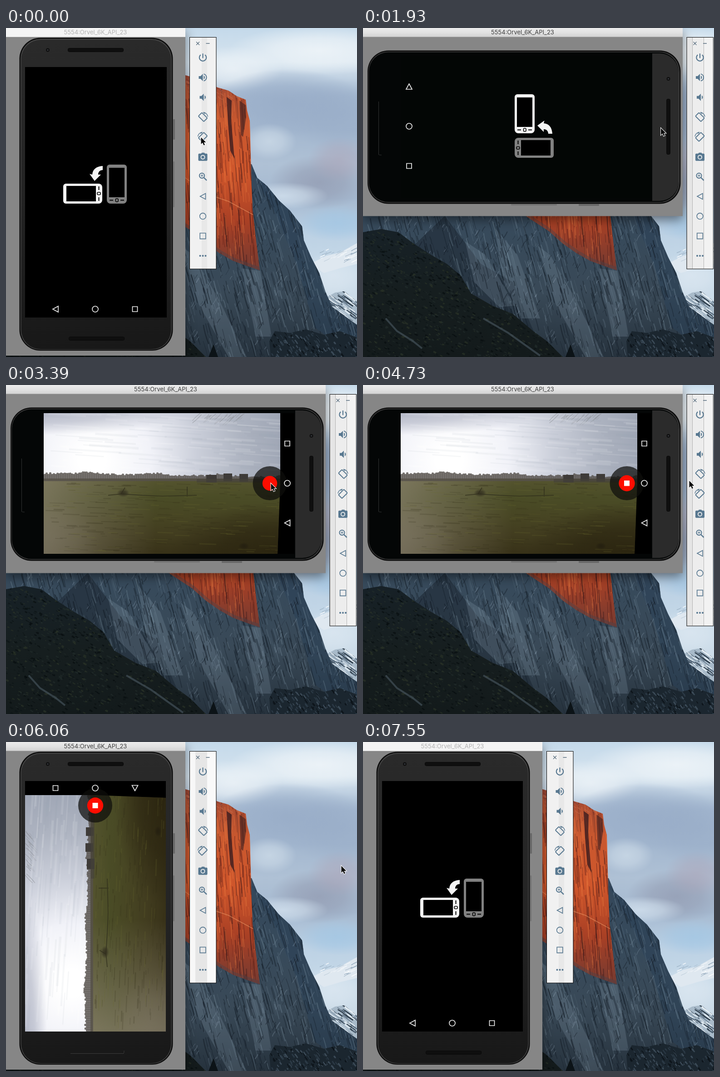
An HTML page with a canvas that plays this animation: 773 px wide and 725 px high, repeating every 7.65 s.

```html
<!DOCTYPE html>
<html lang="en">
<head>
<meta charset="utf-8">
<title>Emulator rotation</title>
<style>
html, body { margin: 0; width: 773px; height: 725px; overflow: hidden; background: #888; }
canvas { display: block; }
#title {
  position: absolute; left: 0; top: 0; height: 20px;
  text-align: center; white-space: pre; font: 13px/19px Inter, "Open Sans", sans-serif;
}
</style>
</head>
<body>
<canvas id="stage" width="773" height="725"></canvas>
<div id="title">5554:Orvel_6K_API_23</div>
<script>
const W = 773, H = 725, LOOP = 7650;
const stage = document.getElementById('stage').getContext('2d');
const title = document.getElementById('title');

// Times at which the picture may change
const STEPS = [0, 300, 450, 590, 1040, 1190, 1340, 1630, 1780, 1930, 2080, 2220, 2370, 2520,
  2660, 2810, 2960, 3110, 3250, 3390, 3540, 3690, 3840, 4140, 4290, 4430, 4580, 4730, 4880,
  5030, 5180, 5470, 5620, 5910, 6060, 6210, 6360, 6650, 6800, 6950, 7550];

// The window turns soon after a click; the screen inside follows a second later
const CLICK = 300, WIDE = 450, REC = 3840, TALL = 5910, IDLE = 7550;
const FLIP_IN = 2145, FLIP_OUT = 6575, FLIP = 400, FADE = 170;

// Pointer path: time, x, y
const PATH = [[0, 429, 241], [590, 429, 241], [1040, 450, 236], [1190, 570, 200], [1340, 668, 171],
  [1630, 672, 196], [1780, 676, 220], [2220, 616, 222], [2810, 615, 222], [3250, 583, 217],
  [4140, 583, 217], [4730, 718, 211], [5030, 734, 204], [5620, 733, 198], [5910, 735, 246],
  [6060, 738, 273], [6210, 762, 300]];

function random(seed) {
  return () => {
    seed = (seed + 0x6d2b79f5) | 0;
    let v = Math.imul(seed ^ seed >>> 15, 1 | seed);
    v = v + Math.imul(v ^ v >>> 7, 61 | v) ^ v;
    return ((v ^ v >>> 14) >>> 0) / 4294967296;
  };
}

function layer(paint) {
  const c = document.createElement('canvas');
  c.width = W; c.height = H;
  paint(c.getContext('2d'));
  return c;
}

function ramp(g, x0, y0, x1, y1, ...stops) {
  const grad = g.createLinearGradient(x0, y0, x1, y1);
  stops.forEach((c, i) => grad.addColorStop(i / (stops.length - 1), c));
  return grad;
}

function box(g, color, x, y, w, h, r = 0) {
  g.fillStyle = color;
  g.beginPath(); g.roundRect(x, y, w, h, r); g.fill();
}

function disc(g, color, x, y, r) {
  g.fillStyle = color;
  g.beginPath(); g.arc(x, y, r, 0, 7); g.fill();
}

const shape = d => new Path2D(d);

function fill(g, color, d) {
  g.fillStyle = color;
  g.fill(shape(d));
}

function line(g, color, width, d) {
  g.strokeStyle = color; g.lineWidth = width;
  g.stroke(shape(d));
}

function blob(g, rgb, alpha, x, y, rx, ry) {
  g.save();
  g.translate(x, y); g.scale(rx, ry);
  const grad = g.createRadialGradient(0, 0, 0, 0, 0, 1);
  grad.addColorStop(0, `rgba(${rgb},${alpha})`);
  grad.addColorStop(.5, `rgba(${rgb},${alpha * .7})`);
  grad.addColorStop(1, `rgba(${rgb},0)`);
  g.fillStyle = grad;
  g.fillRect(-1, -1, 2, 2);
  g.restore();
}

// Scattered strokes running along (dx, dy)
function grain(g, seed, count, [x, y, w, h], dx, dy, width, colors) {
  const rnd = random(seed);
  for (let i = 0; i < count; i++) {
    const px = x + rnd() * w, py = y + rnd() * h, k = .3 + rnd();
    const bend = (rnd() - .5) * 6;
    g.strokeStyle = colors[Math.floor(rnd() * colors.length)];
    g.lineWidth = width * (.4 + rnd());
    g.beginPath();
    g.moveTo(px, py);
    g.quadraticCurveTo(px + dx * k / 2 + bend, py + dy * k / 2, px + dx * k, py + dy * k);
    g.stroke();
  }
}

function masked(g, d, paint) {
  g.save();
  g.clip(shape(d));
  paint();
  g.restore();
}

const wallpaper = layer(g => {
  g.fillStyle = ramp(g, 0, 0, 0, 600, '#c4d9ea', '#d6e4ef', '#a9bdd4', '#a3b7cf', '#afc1d5',
    '#a5b9d0', '#bcd1e4', '#c6d9e8', '#cddce8');
  g.fillRect(0, 0, W, H);
  blob(g, '238,244,248', .9, 690, 50, 200, 55);
  blob(g, '238,244,248', .8, 500, 90, 110, 50);
  blob(g, '152,172,199', .9, 620, 165, 170, 75);
  blob(g, '152,172,199', .7, 740, 190, 130, 80);
  blob(g, '200,215,229', .9, 580, 250, 60, 40);
  blob(g, '150,160,182', .9, 690, 340, 110, 60);
  blob(g, '172,165,184', .6, 735, 290, 70, 50);
  blob(g, '206,221,235', .9, 610, 370, 100, 30);
  blob(g, '163,199,228', .8, 730, 430, 90, 40);
  blob(g, '218,230,240', .9, 720, 545, 80, 50);
  fill(g, '#dfe8f0', 'M670 520L705 502L735 495L773 474V520L740 528L700 540Z');
  grain(g, 3, 30, [690, 490, 80, 28], 14, -7, 1, ['#8fa5b9', '#fff']);
  const slope = 'M700 596L725 583L745 580L773 603V700H690Z';
  fill(g, '#a8bac9', slope);
  masked(g, slope, () =>
    grain(g, 5, 90, [695, 580, 78, 80], 18, 13, 2, ['#2d3c4a', '#e4edf3', '#53677a']));

  const rock = 'M395 300H541L553 330L575 348L601 380L625 402L652 437L656 468L672 505L690 540L703 580L718 614L745 634L773 654V725H0V300Z';
  fill(g, ramp(g, 0, 300, 0, 725, '#33475b', '#374a5b', '#394957', '#26323d'), rock);
  masked(g, rock, () => {
    fill(g, '#2a405688', 'M541 318L590 400L640 520L680 660L773 725V300Z');
    fill(g, '#1c273288', 'M180 414L260 520L330 560L400 725H200L90 500Z');
    for (const d of ['M385 480L412 500L470 600L530 725H490L425 610Z',
      'M225 470L270 500L335 612L300 615L245 560Z',
      'M290 440L340 500L390 640L350 640L310 560Z', 'M520 530L560 535L585 680H550Z'])
      fill(g, '#8a9dad3c', d);
    grain(g, 11, 1500, [0, 310, 773, 410], 10, 36, 2,
      ['#0f182266', '#8da2b340', '#16202b77', '#7489993c', '#0b121a66']);
    grain(g, 13, 500, [0, 310, 773, 410], -7, 12, 1.5, ['#0f182266', '#9fb2c244']);
  });

  const sunlit = 'M330 90L395 104L427 113L440 118L466 131L490 138L508 150L528 158L531 182L537 205L540 320L543 400L551 470L559 534L530 524L500 513L470 496L440 475L410 448L355 412Z';
  fill(g, ramp(g, 0, 100, 0, 535, '#9a4633', '#c9582f', '#cf562b', '#a94025', '#743a31'), sunlit);
  masked(g, sunlit, () => {
    grain(g, 21, 480, [345, 110, 215, 420], 4, 55, 2,
      ['#4a181466', '#f28a4a55', '#6a241a77', '#ea753c55', '#34171966']);
    fill(g, '#3a1c1fcc', 'M486 152L497 160L496 205L503 288L494 270L489 210Z');
    fill(g, '#4a2522aa', 'M514 160L528 170L529 195L522 240L517 235Z');
    line(g, '#f0a06c88', 1.5, 'M395 330L440 365L490 382L545 412');
    grain(g, 23, 70, [395, 108, 140, 45], 9, 6, 2, ['#7e3a35aa', '#c1694daa']);
    line(g, '#4a434966', 14, 'M355 412L410 448L440 475L470 496L500 513L559 534');
  });

  const woods = 'M0 450L40 443L78 450L110 474L150 500L185 520L215 545L238 585L285 612L330 630L375 668L405 690L440 725H0Z';
  fill(g, ramp(g, 0, 440, 0, 725, '#172127', '#161e1f', '#131a1b'), woods);
  masked(g, woods, () => {
    grain(g, 31, 1500, [0, 440, 440, 285], 5, 3, 3, ['#070c0eaa', '#2b3427aa', '#222c2aaa', '#0c1416aa']);
    line(g, '#51606c88', 4, 'M50 640L75 668L110 690L130 706');
    line(g, '#51606c88', 4, 'M265 640L320 672L390 722');
  });
  const trees = 'M583 725L580 690L592 668L625 672L660 664L700 676L735 668L773 682V725Z';
  fill(g, '#1b262f', trees);
  masked(g, trees, () =>
    grain(g, 37, 170, [580, 662, 193, 63], 5, 7, 2.5, ['#0d141a', '#2b3945', '#3b4a57']));
  fill(g, '#0c1317', 'M457 697L467 725H446Z');
});

const field = layer(g => {
  g.clip(shape('M83 61H604V215L598 372H83Z'));
  const glow = g.createRadialGradient(190, 165, 30, 190, 165, 430);
  ['#ffffff', '#f1f2f8', '#cbcfda', '#aeb4c1', '#9ea5b4'].forEach((c, i) => glow.addColorStop(i / 4, c));
  g.fillStyle = glow;
  g.fillRect(83, 61, 521, 160);
  blob(g, '160,165,183', .75, 83, 55, 330, 55);
  grain(g, 41, 120, [83, 62, 500, 125], 90, 6, 4, ['#ffffff1c', '#8f97a814']);
  grain(g, 43, 34, [425, 60, 100, 12], -16, 15, 1, ['#77787a66']);
  g.fillStyle = ramp(g, 0, 206, 0, 372, '#55542f', '#4a4c26', '#474523', '#413c1f', '#373118');
  g.fillRect(83, 206, 521, 170);
  g.fillStyle = ramp(g, 83, 0, 330, 0, '#958d7b99', '#958d7b00');
  g.fillRect(83, 206, 250, 170);
  blob(g, '40,34,14', .8, 590, 370, 230, 110);
  grain(g, 47, 300, [83, 215, 520, 155], 30, 1, 2, ['#2d2b1433', '#6b692f33', '#332e1744']);
  blob(g, '130,124,108', .3, 105, 340, 100, 80);

  // Treeline and farm buildings
  const rnd = random(53);
  for (let x = 83; x < 606; x += 4) {
    const top = 196 + (x - 83) * .016 - Math.max(0, Math.sin(x / 23) * 4) - rnd() * 4;
    box(g, '#55504ccc', x, top, 5, 212 - top, 2);
  }
  for (const [x, y, w] of [[441, 198, 23], [479, 195, 19], [514, 196, 19]]) box(g, '#3e3b38', x, y, w, 17);
  box(g, '#45423a99', 420, 207, 184, 8);
  line(g, '#2f2d1caa', 2, 'M225 243L255 240L300 243L345 245L420 243M253 241L262 226M399 224V246');
  blob(g, '46,42,28', .8, 258, 238, 14, 9);
  blob(g, '36,31,16', .9, 524, 355, 12, 8);
});

function navKeys(g, back, home, recent) {
  g.strokeStyle = '#ececec'; g.lineWidth = 1.7;
  g.beginPath();
  g.moveTo(back[0] - 6, back[1]); g.lineTo(back[0] + 6, back[1] - 6.5); g.lineTo(back[0] + 6, back[1] + 6.5);
  g.closePath();
  g.moveTo(home[0] + 6.5, home[1]); g.arc(...home, 6.5, 0, 2 * Math.PI);
  g.rect(recent[0] - 5.5, recent[1] - 5.5, 11, 11);
  g.stroke();
}

// Small phone pictogram, 44 by 86, upright
function miniPhone(g, color) {
  box(g, color, 0, 0, 44, 86, [6, 6, 8, 8]);
  box(g, '#000', 5, 7, 34, 65);
  box(g, '#000', 6, 77.5, 8, 2);
  box(g, '#000', 30, 77.5, 8, 2);
  g.strokeStyle = '#000'; g.lineWidth = 1.6;
  g.beginPath(); g.roundRect(19.5, 75, 5.5, 7, 2); g.stroke();
}

function prompt(g) {
  g.save(); g.translate(222, 301); miniPhone(g, '#818181'); g.restore();
  g.save(); g.translate(126, 387); g.rotate(-Math.PI / 2); miniPhone(g, '#f5f5f5'); g.restore();
  fill(g, '#f5f5f5', 'M213 304C199 305 191 311 190 323L184 321.5L195 337L209 323L203 323C203 317 207 313 213 313Z');
  navKeys(g, [109, 619.5], [196.5, 619.5], [284, 619.5]);
}

// A landscape device is the upright one turned a quarter clockwise
function toLandscape(g) { g.translate(721, 20); g.rotate(Math.PI / 2); }
function toUpright(g) { g.translate(-20, 721); g.rotate(-Math.PI / 2); }

function camera(g, recording) {
  g.save();
  toUpright(g);
  box(g, '#000', 83, 61, 554, 313);
  g.drawImage(field, 0, 0);
  disc(g, 'rgba(15,14,12,.72)', 581, 216.5, 37.5);
  disc(g, '#fd0d00', 581, 216.5, recording ? 17.7 : 16.2);
  if (recording) box(g, '#fff', 575, 210.5, 12, 12);
  navKeys(g, [619.5, 304], [619.5, 216.5], [619.5, 129]);
  g.restore();
}

function turned(g, degrees, alpha, paint) {
  g.save();
  g.globalAlpha = alpha;
  g.translate(197, 361); g.rotate(degrees * Math.PI / 180); g.translate(-197, -361);
  paint(g);
  g.restore();
}

// The half turn decelerates with the fifth power while the old screen fades
function screen(g, t, wide) {
  const cam = c => camera(c, t >= REC);
  const leaving = t >= TALL;
  const [from, to] = leaving ? [cam, prompt] : [prompt, cam];
  const age = t - (leaving ? FLIP_OUT : FLIP_IN);
  g.save();
  g.beginPath(); g.rect(42, 86, age < 0 && !leaving ? 312 : 310, 552); g.clip();
  box(g, wide ? '#030605' : '#000', 42, 86, 312, 552);
  if (age < 0) from(g);
  else {
    const angle = 180 * Math.max(0, 1 - age / FLIP) ** 5;
    turned(g, angle, 1, to);
    if (age < FADE) turned(g, angle - 180, 1 - age / FADE, from);
  }
  g.restore();
}

function grille(g, x, y) {
  box(g, '#0a0a0a', x, y, 123, 9, 4);
  for (let i = 0; i < 40; i++)
    for (let j = 0; j < 3; j++) box(g, '#2f2f2f', x + 2.5 + i * 3, y + 1.5 + j * 2.5, 1, 1);
}

// Drawn upright; the caller turns the whole device
function device(g, t, wide, fresh) {
  box(g, '#686868', 368, 201, 4, 45, 1);
  box(g, '#727272', 368, 294, 3, 101, 1);
  box(g, '#0c0c0c', 29.5, 21.5, 338, 689.5, 46);
  box(g, wide ? '#3a3a3a' : '#454545', 32, 24, 333, 685, 44);
  box(g, wide ? '#040606' : ramp(g, 0, 24, 0, 710, '#2a2a2a', '#242424', '#181818'), 33.5, 26, 330, 682, 43);
  if (wide) box(g, '#2b2b2b', 36, 26, 325, 58, [42, 42, 0, 0]);
  disc(g, '#101010', 92, 48.5, 4);
  disc(g, '#3b3f45', 92, 48.5, 1.5);
  grille(g, 136, 44);
  if (fresh) grille(g, 138, 680);
  else line(g, wide ? '#303232' : '#3c3c3c', 1, 'M142 686.5H259Q260 686 260 680');
  screen(g, t, wide);
}

const INK = '#587890';

function rotateIcon(g, flip) {
  g.save();
  g.scale(flip, 1);
  g.save(); g.rotate(-Math.PI / 4);
  g.lineWidth = 2; g.strokeStyle = INK;
  g.beginPath(); g.roundRect(-5.5, -8.5, 11, 17, 1.5); g.stroke();
  g.restore();
  line(g, INK, 1.5, 'M1 -10.5A11 11 0 0 1 11 -1M1 -10.5L5 -7');
  g.restore();
}

const ICONS = [
  g => line(g, INK, 2.2, 'M-4.8 -6.2A7.7 7.7 0 1 0 4.8 -6.2M0 -9V1'),
  g => {
    fill(g, INK, 'M-9 -3H-5L0 -8V8L-5 3H-9ZM2 -4.5Q7 0 2 4.5Z');
    line(g, INK, 2, 'M2 -7.6A7.8 7.8 0 0 1 2 7.6');
  },
  g => fill(g, INK, 'M-7 -3H-3L2 -8V8L-3 3H-7ZM4 -4.5Q9 0 4 4.5Z'),
  g => rotateIcon(g, 1),
  g => rotateIcon(g, -1),
  g => {
    fill(g, INK, 'M-8 -7H-4L-2 -9H3L5 -7H8Q10 -7 10 -5V7Q10 9 8 9H-8Q-10 9 -10 7V-5Q-10 -7 -8 -7Z');
    disc(g, '#efefef', 0, 1, 5);
    disc(g, INK, 0, 1, 3.2);
  },
  g => {
    g.strokeStyle = INK; g.lineWidth = 2;
    g.beginPath(); g.arc(-2, -2, 5.6, 0, 7); g.stroke();
    line(g, INK, 2.4, 'M2.5 2.5L8.5 8.5');
    line(g, INK, 1.3, 'M-5 -2H1M-2 -5V1');
  },
  g => line(g, INK, 1.6, 'M-6 0L6 -6.5V6.5Z'),
  g => line(g, INK, 1.6, 'M6.8 0A6.8 6.8 0 1 1 -6.8 0A6.8 6.8 0 1 1 6.8 0Z'),
  g => line(g, INK, 1.6, 'M-6.3 -6.3H6.3V6.3H-6.3Z'),
  g => { for (const x of [-6, 0, 6]) disc(g, INK, x, 0, 2); }
];

function toolbar(g, x, cuts, tones) {
  g.save();
  g.translate(x, 0);
  box(g, '#000', 0, 20, 59.5, 511.5);
  tones.forEach((c, i) => box(g, c, cuts[i], 21, cuts[i + 1] - cuts[i], 509.5));
  line(g, '#5a6f80', 1.3, 'M15 30.5L22 37.5M22 30.5L15 37.5M36.5 34H44.5');
  ICONS.forEach((icon, i) => {
    g.save();
    g.translate(29.5, 65.3 + i * 43.67);
    icon(g);
    g.restore();
  });
  g.restore();
}

function pointer(g, t) {
  const i = PATH.findIndex(p => p[0] > t);
  if (i < 0 && t > PATH.at(-1)[0]) return;
  const [t0, x0, y0] = PATH.at(i < 0 ? -1 : i - 1), [t1, x1, y1] = PATH.at(i);
  const k = t1 > t0 ? (t - t0) / (t1 - t0) : 0;
  g.save();
  g.translate(x0 + (x1 - x0) * k, y0 + (y1 - y0) * k);
  const arrow = 'M.5 0V15L4 11.8L6.5 17.5L9 16.4L6.6 10.9H11.3Z';
  line(g, '#fff', 2, arrow);
  fill(g, '#0a0a0a', arrow);
  g.restore();
}

function draw(t) {
  const g = stage;
  const wide = t >= WIDE && t < TALL, fresh = t < WIDE || t >= IDLE;
  const idle = t < CLICK || t >= IDLE;
  const w = wide ? 704 : 395, h = wide ? 414.5 : 722;
  g.drawImage(wallpaper, 0, 0);

  g.save();
  g.shadowColor = 'rgba(0,0,0,.45)'; g.shadowBlur = 22; g.shadowOffsetY = 8;
  box(g, '#868686', 0, 0, w, h);
  g.restore();
  box(g, idle ? '#f4f4f4' : ramp(g, 0, 0, 0, 20, '#ececec', '#e2e2e2', '#d2d2d2'), 0, 0, w, 20);
  box(g, idle ? '#dcdcdc' : '#b5b5b5', 0, 19, w, 1);

  g.save();
  if (wide) toLandscape(g);
  device(g, t, wide, fresh);
  g.restore();

  if (wide) toolbar(g, 712.5, [1, 13, 38, 58.5], ['#e5e5e5', '#ededed', '#f2f2f2']);
  else if (fresh) toolbar(g, 404, [1, 27, 39, 58.5], ['#f1f1f1', '#e8e8e8', '#f1f1f1']);
  else toolbar(g, 404, [1, 13, 39, 58.5], ['#f7f7f7', '#e6e6e6', '#f9f9f9']);
  pointer(g, t);

  title.style.width = w - 1 + 'px';
  title.style.color = idle ? '#b2b2b2' : '#3c3c3c';
}

let shown = -1;
function tick() {
  const now = performance.now() % LOOP;
  const t = STEPS.findLast(s => s <= now);
  if (t !== shown) draw(shown = t);
  requestAnimationFrame(tick);
}
tick();
</script>
</body>
</html>
```
